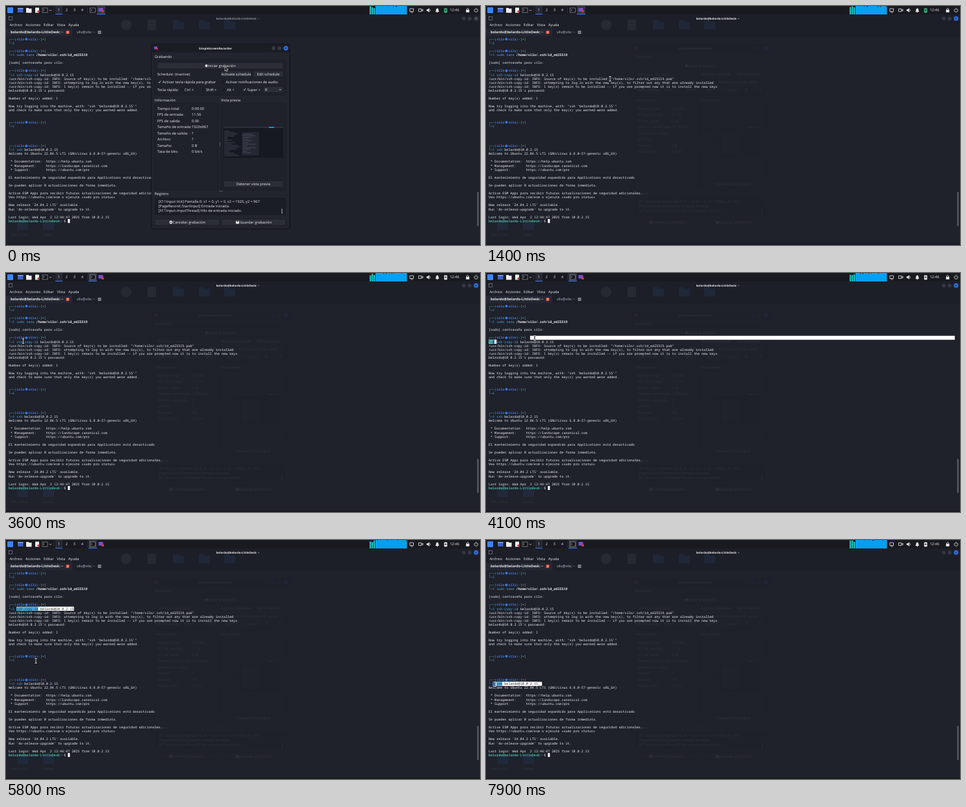
Write an HTML page that moves like this. It is 730x368 px and loops after 8000 ms.

```html
<!DOCTYPE html>
<html lang="es">
<head>
<meta charset="utf-8">
<title>Terminal</title>
<style>
html, body { margin: 0; width: 100%; height: 100%; overflow: hidden; background: #1f212b; }
svg { display: block; width: 730px; height: 368px; }
text { white-space: pre; text-rendering: geometricPrecision; font: 5.65px "Open Sans", "Noto Sans", sans-serif; fill: #e8e9ec; }
text.mono { font: 5.073px "Noto Sans Mono", "DejaVu Sans Mono", monospace; }
text.b { font-weight: 700; }
</style>
</head>
<body>
<script>
const LOOP = 8000, CELL = 3.044, LINE = 6.087, LEFT = 4, TOP = 48;
const BG = '#1f212b', WHITE = '#eceef2', GREEN = '#47b9a5', BLUE = '#367bf0', CYAN = '#49aee6';
const USER = 'belardo', HOST = 'LittleDesk', LOCAL = 'vilo';
const REMOTE = `${USER}@10.0.2.15`, TITLE = `${USER}@${USER}-${HOST}: ~`;

// ---- drawing helpers
const rect = (x, y, w, h, fill, more = '') =>
  `<rect x="${x}" y="${y}" width="${w}" height="${h}" fill="${fill}" ${more}/>`;
const circle = (x, y, r, fill) => `<circle cx="${x}" cy="${y}" r="${r}" fill="${fill}"/>`;
const path = (d, stroke = '#e8e9ec', w = .8, fill = 'none') =>
  `<path d="${d}" fill="${fill}" stroke="${stroke}" stroke-width="${w}"/>`;
const escape = s => s.replace(/&/g, '&amp;').replace(/</g, '&lt;');
const label = (x, y, s, { size = 5.65, fill = '#e8e9ec', bold, mid } = {}) =>
  `<text x="${x}" y="${y + 2}" ${bold ? 'class="b"' : ''} ${mid ? 'text-anchor="middle"' : ''} style="font-size:${size}px;fill:${fill}">${escape(s)}</text>`;
const button = (x, y, w, h, s = '', shift = 0) =>
  rect(x, y, w, h, '#2b2d37', 'rx="1" stroke="#15161c" stroke-width=".6"') +
  label(x + w / 2 + shift, y + h / 2, s, { mid: true });
const panel = (x, y, w, h) => rect(x, y, w, h, '#20222b', 'rx="1" stroke="#181a21" stroke-width=".7"');
const cross = (x, y, r, color) => path(`M${x - r} ${y - r}l${2 * r} ${2 * r}m0 ${-2 * r}l${-2 * r} ${2 * r}`, color, .7);
const check = (x, y) => path(`M${x - 1.6} ${y}l1.2 1.4l2-3.2`);
const noise = n => { const v = Math.sin(n * 127.1 + 3.7) * 43758.5453; return v - Math.floor(v); };

// ---- terminal text: rows of [text, colour, bold] spans
const rows = {};
const put = (r, ...spans) => rows[r] = spans.map(s => [].concat(s));
function prompt(r, ...command) {
  put(r, ['┌──(', GREEN], [`${LOCAL}  ${LOCAL}`, BLUE, 1], [')-[', GREEN], ['~', WHITE, 1], [']', GREEN]);
  put(r + 1, ['└─', GREEN], ['$', BLUE], ' ', ...command);
}
prompt(0);
prompt(3, ['sudo', CYAN], ' ', ['nano', CYAN], ' ', [`/home/${LOCAL}/.ssh/id_ed25519`, WHITE, 1]);
prompt(8, ['ssh-copy-id', CYAN], ' ' + REMOTE);
prompt(21);
prompt(27, ['ssh', CYAN], ' ' + REMOTE);
const INFO = '/usr/bin/ssh-copy-id: INFO: ';
const plain = {
  6: `[sudo] contraseña para ${LOCAL}:`,
  10: `${INFO}Source of key(s) to be installed: "/home/${LOCAL}/.ssh/id_ed25519.pub"`,
  11: INFO + 'attempting to log in with the new key(s), to filter out any that are already installed',
  12: INFO + '1 key(s) remain to be installed -- if you are prompted now it is to install the new keys',
  13: `${REMOTE}'s password:`,
  15: 'Number of key(s) added: 1',
  17: `Now try logging into the machine, with: "ssh '${REMOTE}'"`,
  18: 'and check to make sure that only the key(s) you wanted were added.',
  29: 'Welcome to Ubuntu 22.04.5 LTS (GNU/Linux 6.8.0-57-generic x86_64)',
  31: ' * Documentation:  https://help.ubuntu.com',
  32: ' * Management:     https://landscape.canonical.com',
  33: ' * Support:        https://ubuntu.com/pro',
  35: 'El mantenimiento de seguridad expandido para Applications está desactivado',
  37: 'Se pueden aplicar 0 actualizaciones de forma inmediata.',
  39: 'Active ESM Apps para recibir futuras actualizaciones de seguridad adicionales.',
  40: 'Vea https://ubuntu.com/esm o ejecute «sudo pro status»',
  42: "New release '24.04.2 LTS' available.",
  43: "Run 'do-release-upgrade' to upgrade to it.",
  45: 'Last login: Wed Apr  2 12:44:47 2025 from 10.0.2.15',
};
for (const r in plain) put(r, plain[r]);
put(46, [`${USER}@${USER}-${HOST}`, GREEN, 1], ':', ['~', BLUE, 1], '$');

const cellX = c => LEFT + c * CELL, rowY = r => TOP + r * LINE;
const mono = (r, c, s, fill, bold) => s.trim() &&
  `<text class="mono ${bold ? 'b' : ''}" x="${cellX(c)}" y="${rowY(r) + 4.8}" style="fill:${fill}">${escape(s)}</text>`;

function terminalText() {
  let out = '';
  for (const r in rows) {
    let c = 0;
    for (const [s, color = WHITE, bold] of rows[r]) {
      out += mono(+r, c, s, color, bold);
      c += s.length;
    }
  }
  for (const r of [0, 3, 8, 21, 27]) out += circle(cellX(9), rowY(r) + 3.1, 2, BLUE);
  return out + rect(cellX(30), rowY(46), CELL, LINE, '#fff');
}

// Inverse video for cells a..b of one row
function invert(r, a, b, toEdge) {
  let out = rect(cellX(a), rowY(r), (toEdge ? 722 : cellX(b)) - cellX(a), LINE, '#fff'), c = 0;
  for (const [s, color = '#fff', bold] of rows[r]) {
    const from = Math.max(a, c), to = Math.min(b, c + s.length);
    if (to > from) {
      out += rect(cellX(from), rowY(r), (to - from) * CELL, LINE, color) +
        mono(r, from, s.slice(from - c, to - c), BG, bold);
    }
    c += s.length;
  }
  return out;
}

// ---- fixed parts
const dotButtons = (x, y, active) =>
  circle(x - 19, y, 2.9, '#343744') + circle(x - 10, y, 2.9, '#343744') +
  circle(x, y, 3.5, active ? '#2f6fe8' : '#343744') + cross(x, y, 1.2, active ? '#10131c' : '#777b88');

function desktopGhost() {
  const folder = (x, y) => rect(x - 8, y - 7, 8, 4, '#3c7cd8') + rect(x - 8, y - 5, 17, 12, '#3c7cd8', 'rx="1"');
  return '<g opacity=".09">' + circle(185, 29, 8, '#8a93a5') + rect(218, 21, 13, 16, '#8a93a5') +
    [265, 305, 344].map(x => folder(x, 29)).join('') + folder(25, 338) + folder(65, 338) +
    label(21, 352, 'Mis Fotos', { mid: true }) + label(65, 352, 'Datos', { mid: true }) + '</g>';
}

function recorder() {
  const facts = [['Tiempo total:', '0:00:00'], ['FPS de entrada:', '11.56'], ['FPS de salida:', '0.00'],
    ['Tamaño de entrada:', '1920x967'], ['Tamaño de salida:', '?'], ['Archivo:', '?'],
    ['Tamaño:', '0 B'], ['Tasa de bits:', '0 bit/s']];
  let preview = rect(335, 186, 92, 48, '#171922') + rect(335, 186, 92, 1.7, '#30333e') + rect(405, 186, 8, 1.6, '#1aa5ee');
  for (let i = 0; i < 20; i++) {
    preview += rect(336, 192 + i * 2, 5 + 20 * noise(i), .6, '#6b7080', 'opacity=".65"');
  }
  preview += rect(363, 193.5, 27, 37, '#252833', 'stroke="#0f1117" stroke-width=".4"');
  for (let i = 0; i < 12; i++) preview += rect(364.5, 197 + i * 2.6, 7 + 15 * noise(i + 40), .6, '#7c8190', 'opacity=".6"');
  return rect(224, 59, 213, 284, '#23252e', 'rx="2" stroke="#101217" stroke-width="1"') +
    rect(224.5, 59.5, 212, 12, '#1b1d24', 'rx="2"') +
    rect(228, 62.5, 5, 4, '#7a4fd0') + circle(232.5, 66, 1.4, '#e0354b') +
    label(322.5, 65, 'SimpleScreenRecorder', { size: 4.55, bold: true, mid: true }) + dotButtons(431, 65, true) +
    label(229, 78, 'Grabando') + panel(229, 83, 202, 54) +
    button(233, 87, 194, 10, 'Iniciar grabación', 2) + circle(308.5, 92, 1.9, '#f2f3f5') +
    label(233, 104.7, 'Schedule: (inactive)') +
    button(331, 100, 47, 9.4, 'Activate schedule') + button(381, 100, 46, 9.4, 'Edit schedule') +
    check(236.5, 117) + label(241, 117, 'Activar tecla rápida para grabar') +
    rect(332, 115, 4, 4, '#1a1c23') + label(338.5, 117, 'Activar notificaciones de audio') +
    label(233, 128.7, 'Tecla rápida:') + label(275, 128.7, 'Ctrl +') + label(308, 128.7, 'Shift +') +
    label(340, 128.7, 'Alt +') + label(371.5, 128.7, 'Super +') + check(367.5, 128.7) +
    [269, 302, 334].map(x => rect(x, 126.7, 4, 4, '#1a1c23')).join('') +
    button(396, 124, 31, 9.5) + label(399, 128.7, 'R') + path('M421 128l1.4 1.4l1.4-1.4') +
    label(229, 145, 'Información') + label(331, 145, 'Vista previa') +
    panel(229, 150, 98, 133) + panel(331, 150, 100, 133) +
    facts.map(([k, v], i) => label(233, 157.5 + i * 9.5, k) + label(286, 157.5 + i * 9.5, v)).join('') +
    preview + button(335, 269, 92, 10, 'Detener vista previa') +
    rect(329, 210, 1, 6, '#555966') + rect(328, 284.5, 6, 1, '#555966') +
    label(229, 289, 'Registro') + rect(229, 295, 202, 27, '#1b1d25', 'rx="1"') +
    ['[X11Input::Init] Pantalla 0: x1 = 0, y1 = 0, x2 = 1920, y2 = 967', '[PageRecord::StartInput] Entrada iniciada.',
      '[X11Input::InputThread] Hilo de entrada iniciado.'].map((s, i) => label(235, 301 + i * 7.2, s)).join('') +
    rect(424, 312, 2, 8, '#6a6e7b', 'rx="1"') +
    button(229, 328, 100, 9.8, 'Cancelar grabación', 3) + circle(254, 333, 2.4, '#e8e9ec') + cross(254, 333, 1, '#2b2d37') +
    button(332, 328, 99, 9.8, 'Guardar grabación', 3) + rect(354, 330.7, 5, 4.6, '#e8e9ec') + rect(355.3, 330.7, 2.4, 1.6, '#2b2d37');
}

const shell = (x, w = 8) => rect(x - w / 2, 3, w, 7, '#14151a', 'stroke="#a9adb8" stroke-width=".6"') + path(`M${x - 2.5} 5l1.5 1.3l-1.5 1.3`, '#eee', .6);

function topBar() {
  return rect(0, 0, 730, 13, '#191a20') +
    rect(2, 2, 9, 9, '#3e83f5', 'rx="1"') + rect(18, 3, 8.5, 7, '#3b60c8', 'rx=".6"') + rect(18, 3, 8.5, 1.5, '#7fa3f0') +
    rect(31, 4, 8.5, 6.4, '#eef0f3', 'rx=".6"') + rect(31, 3, 4, 2, '#eef0f3') +
    rect(45, 2.5, 6, 8, '#f2f2f2') + circle(50, 8.5, 1.8, '#d63a43') +
    shell(60) + path('M67 5.8l1.6 1.6l1.6-1.6') +
    rect(73, 2, .5, 9, '#3a3d47') + rect(76, 0, 11, 13, '#262933') + rect(76, 12, 11, 1, BLUE) +
    ['1', '2', '3', '4'].map((s, i) => label(81.4 + i * 12, 6.4, s, { mid: true })).join('') + rect(125, 2, .5, 9, '#3a3d47') +
    path('M622 4h5.5v4.5h-5.5zM623.5 10h3') + path('M635.5 4.3h4.2v4.2h-4.2zM640 6.4l2-1.5v3z') +
    path('M648 5.5h1.3l2-1.8v5.6l-2-1.8h-1.3z', '#eee', .5, '#eee') + path('M652.5 4.5q1.6 2 0 4') +
    path('M661.5 8.7q1-1 1-3q.2-2 1.7-2t1.7 2q0 2 1 3z', '#eee', .4, '#eee') + circle(664.2, 9.5, .8, '#eee') +
    label(690.8, 6.4, '12:46', { mid: true, size: 5.7 }) +
    rect(708.5, 5.8, 5, 4, '#eee') + path('M709.5 6v-1.5q1.5-2.4 3 0v1.5') +
    path('M722.3 4.3a2.8 2.8 0 1 0 3.4 0M724 2.8v3.6');
}

const menu = [[5.5, 'Archivo'], [30, 'Acciones'], [58, 'Editar'], [78.5, 'Vista'], [96, 'Ayuda']];
document.body.innerHTML = `<svg viewBox="0 0 730 368">` +
  rect(0, 0, 730, 368, BG) + rect(0, 13, 730, 34, '#1d1f28') + rect(0, 366, 730, 2, '#17181f') +
  `<defs><g id="win">${recorder()}</g></defs>` +
  desktopGhost() + '<use href="#win" opacity=".07"/>' + topBar() +
  rect(4.5, 16.5, 5, 5, '#14151a', 'stroke="#9da2ad" stroke-width=".6"') +
  rect(0, 35, 102, 11.5, '#252832') + label(7, 40.4, TITLE, { size: 5.4, bold: true }) +
  rect(92.5, 38, 5, 5, '#e2533f', 'rx=".8"') + cross(95, 40.5, 1, '#fff') +
  label(109, 40.4, `${LOCAL}@${LOCAL}: ~`, { fill: '#c3c6ce', size: 5.4 }) +
  rect(141.5, 38, 5, 5, '#8b8f99', 'rx=".8"') + cross(144, 40.5, 1, '#1d1f28') +
  menu.map(([x, s]) => label(x, 29.3, s)).join('') +
  rect(725.6, 286, 2.4, 53, '#555966', 'rx="1.2"') + terminalText() +
  '<g id="live"></g></svg>';
const live = document.getElementById('live');

// ---- motion
const track = [[0, 338, 96], [300, 147, 7], [700, 147, 7], [1400, 191, 112], [1800, 191, 112], [2600, 68, 107],
  [2700, 68, 107], [3300, 16, 106], [3500, 16, 106], [4000, 68, 100], [4100, 75, 100], [4300, 88, 100], [4700, 104, 106],
  [5000, 104, 106], [5800, 46, 186], [5900, 46, 186], [6800, 86, 222], [6900, 86, 222], [7000, 68, 222], [7100, 46, 222],
  [7300, 11, 222], [7800, 11, 222], [7900, 14, 222], [LOOP, 14, 222]];

function mouseAt(t) {
  const i = Math.max(1, track.findIndex(p => p[0] >= t));
  const [t0, x0, y0] = track[i - 1], [t1, x1, y1] = track[i], k = (t - t0) / (t1 - t0);
  return [x0 + (x1 - x0) * k, y0 + (y1 - y0) * k];
}
const cellAt = ([x, y]) => [Math.round((y - 51) / LINE), Math.round((x - LEFT) / CELL)];

// The selection trails the pointer by one step
function selection(t) {
  const second = t >= 7000;
  if (t < 3500 || (t >= 6700 && !second)) return '';
  const anchor = second ? [28, 27] : [9, 4];
  const head = cellAt(mouseAt(second ? t - 100 : Math.min(t - 100, 4800)));
  if (head[0] < anchor[0]) return invert(head[0], head[1], 999, true) + invert(anchor[0], 0, anchor[1]);
  const [a, b] = [anchor[1], head[1]].sort((p, q) => p - q);
  return a === b ? '' : invert(anchor[0], a, b);
}

function hoverLine([x, y]) {
  const [r] = cellAt([x, y]), start = { 9: 16, 28: 8 }[r];
  if (!start || x < cellX(start) || x > cellX(start + REMOTE.length)) return '';
  return rect(cellX(start), rowY(r) + 5.4, REMOTE.length * CELL, .6, WHITE);
}

function cpu(step) {
  let out = rect(569, 0, 48.5, 13, '#079ff0');
  for (let i = 0; i < 3; i++) {
    const h = 13 - 4 * noise(step * 3 + i);
    out += rect(560 + i * 3, 13 - h, 2.2, h, '#16c9c4');
  }
  for (let i = 0; i < 48; i++) {
    if (noise(i + step) > .85) out += rect(569 + i, 0, 1, 1.6 * noise(i + step + 9), '#191a20');
  }
  return out;
}

function pointer([x, y], windowOpen) {
  const beam = `M${x - 1.6} ${y - 3.5}h3.2M${x} ${y - 3.5}v7M${x - 1.6} ${y + 3.5}h3.2`;
  return y > 48 && !windowOpen ? path(beam, '#15161c', 1.8) + path(beam, '#fff', .8)
    : path(`M${x - 1} ${y - 3}v7l1.7-1.5l1.2 2.4l1.2-.6l-1.2-2.3h2.2z`, '#fff', .6, '#111');
}

function draw(t) {
  const open = t < 700, late = t >= 2700, m = mouseAt(t);
  live.innerHTML = cpu(t / 100) +
    rect(late ? 127 : 140, 0, 13, 13, '#30333f') + rect(late ? 127 : 140, 12, 13, 1, BLUE) + shell(133.5) +
    rect(142.5, 3, 7, 5.5, '#7650cf', 'rx=".5"') + circle(149, 8.3, 2, '#e0354b') +
    rect(674.8, 3.5, 4.6, 6.8, late ? '#eceef2' : '#39b982', 'rx=".6"') + rect(676.2, 5.5, 1.8, 2.2, '#191a20') +
    label(357, 19.3, TITLE, { size: 4.43, bold: true, mid: true, fill: open ? '#8b8f9a' : '#e8e9ec' }) + dotButtons(724, 19.3, !open) +
    (open ? '' : hoverLine(m)) + selection(t) + (open ? '<use href="#win"/>' : '') + pointer(m, open);
}

const begin = performance.now();
let shown = -1;
function frame() {
  const t = Math.floor((performance.now() - begin) % LOOP / 100) * 100;
  if (t !== shown) draw(shown = t);
  requestAnimationFrame(frame);
}
frame();
</script>
</body>
</html>
```
